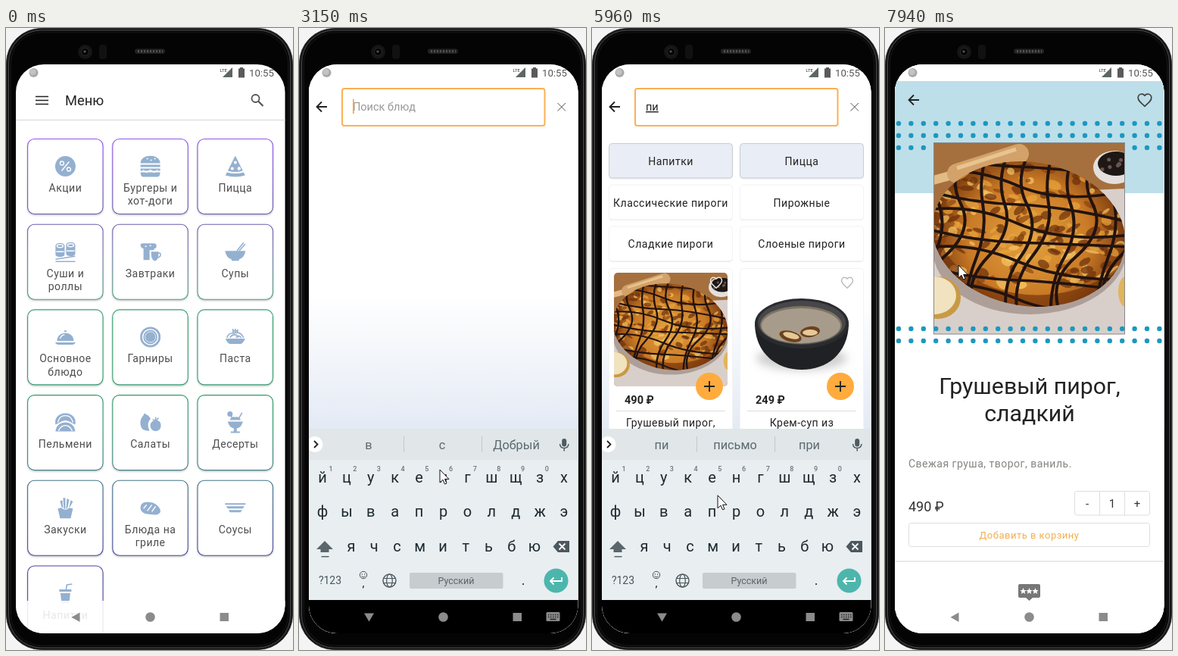
Animation, 379 px wide and 821 px high, one loop 8 s. Source, as an HTML page:

```html
<!DOCTYPE html>
<html lang="ru">
<head>
<meta charset="utf-8">
<title>Меню</title>
<style>
html, body { margin: 0; width: 100%; height: 100%; overflow: hidden; background: #f4f4f4 }
svg { display: block; width: 379px; height: 821px; font-family: Roboto, "Open Sans", sans-serif }
.m { text-anchor: middle }
.ls { letter-spacing: .5px }
.i { fill: #94b0d0; stroke: none }
.l { fill: none; stroke: #94b0d0; stroke-width: 1.6 }
.w { fill: none; stroke: #fff; stroke-width: 1.4 }
</style>
</head>
<body>
<svg id="stage" viewBox="0 0 379 821"></svg>
<script>
const LOOP = 8000;
const range = (n, f) => Array.from({ length: n }, (_, i) => f(i)).join('');
const text = (x, y, s, size, fill, cls = '', more = '') =>
  `<text x="${x}" y="${y}" font-size="${size}" fill="${fill}" class="${cls}" ${more}>${s}</text>`;
const rect = (x, y, w, h, fill, r = 0, more = '') =>
  `<rect x="${x}" y="${y}" width="${w}" height="${h}" rx="${r}" fill="${fill}" ${more}/>`;
const circle = (x, y, r, fill, more = '') => `<circle cx="${x}" cy="${y}" r="${r}" fill="${fill}" ${more}/>`;
const oval = (x, y, rx, ry, fill, more = '') => `<ellipse cx="${x}" cy="${y}" rx="${rx}" ry="${ry}" fill="${fill}" ${more}/>`;
const line = (d, stroke, w = 1, more = '') => `<path d="${d}" fill="none" stroke="${stroke}" stroke-width="${w}" ${more}/>`;
const shape = (d, fill, more = '') => `<path d="${d}" fill="${fill}" ${more}/>`;
const p = (cls, d) => `<path class="${cls}" d="${d}"/>`;
const at = (x, y, body, s = 1) => `<g transform="translate(${x} ${y}) scale(${s})">${body}</g>`;
const group = (id, body) => `<g id="${id}">${body}</g>`;
let seed = 7;
const rnd = () => (seed = seed * 16807 % 2147483647) / 2147483647;

const heart = (x, y, s, c) => at(x, y, line('M0 9.5C-6 4-10 1-10-3.5C-10-6.5-7.6-9-4.5-9C-2.8-9-1-8 0-6.7C1-8 2.8-9 4.5-9C7.6-9 10-6.5 10-3.5C10 1 6 4 0 9.5Z', c, 2), s);
const back = (x, y) => line(`M${x + 7} ${y}H${x - 6}M${x} ${y - 6.5}L${x - 6.5} ${y}L${x} ${y + 6.5}`, '#222', 1.8);

// Menu
const dishes = [
  ['Акции', p('i', 'M-13.5 0a13.5 13.5 0 1 0 27 0a13.5 13.5 0 1 0-27 0') + p('w', 'M5-6L-5 6M-7-4a2.5 2.5 0 1 0 5 0a2.5 2.5 0 1 0-5 0M2 4a2.5 2.5 0 1 0 5 0a2.5 2.5 0 1 0-5 0')],
  ['Бургеры и|хот-доги', p('i', 'M-13-4C-13-17 13-17 13-4ZM-13-2H13V1H-13ZM-13 3H13V6H-13ZM-13 8H13Q13 14 9 14H-9Q-13 14-13 8') + p('w', 'M-5-10h2M0-8h2M5-10h2M-10 5L-5 8L0 5L5 8L10 5')],
  ['Пицца', p('i', 'M0-14L10 6Q0 9-10 6ZM-11 8Q0 11 11 8L13 12Q0 16-13 12Z') + circle(0, -5, 2, '#fff') + circle(-4, 3, 2, '#fff') + circle(5, 3, 2.2, '#fff')],
  ['Суши и|роллы', p('i', 'M-13-8a6 3.5 0 0 1 12 0V4a6 3 0 0 1-12 0ZM1-9a6 3.5 0 0 1 12 0V3a6 3 0 0 1-12 0Z') + p('w', 'M-11-7.5a4 2 0 1 0 8 0a4 2 0 1 0-8 0M3-8.5a4 2 0 1 0 8 0a4 2 0 1 0-8 0M-12 0h10M2-1h10') + p('l', 'M-13 10L13 6M-13 13H13')],
  ['Завтраки', p('i', 'M-13-9Q-13-11-10-11H4Q9-11 8-7Q8-4 5-4V-2H-1V11H-9V-4Q-13-5-13-9M1 0H11Q11 12 6 12Q1 12 1 0') + p('l', 'M10 2q5-1 3 4q-2 2-4 2') + p('w', 'M-7-7h2M-1-8h2')],
  ['Супы', p('i', 'M-13.5-1H13.5Q12 8 5 10V12H-5V10Q-12 8-13.5-1') + p('l', 'M2-1L11-12M5-1L13-10')],
  ['Основное|блюдо', p('i', 'M-11 5C-11-9 11-9 11 5ZM-13.5 7H13.5Q12 10 9 10H-9Q-12 10-13.5 7M-2-7a2 2 0 1 1 4 0') + p('w', 'M-7 2Q-5-3-1-3')],
  ['Гарниры', circle(0, 0, 13.5, '#94b0d0') + circle(0, 0, 10, 'none', 'class="w"') + circle(0, 0, 7, 'none', 'stroke="#fff" stroke-width=".7"')],
  ['Паста', p('i', 'M-13 2H13Q10 9 7 9H-7Q-10 9-13 2') + p('l', 'M-11 1Q-9-6-2-5Q7-8 11 1M-7 1Q-5-3-1-3T4 1M1 1Q4-4 8 1M-3-5V-11M0-5V-11M3-5V-10M-3-8H3')],
  ['Пельмени', p('i', 'M-13 3C-17-17 17-17 13 3L9 1Q0-6-9 1ZM-13 12C-12-4 12-4 13 12Z') + p('w', 'M-10 0Q-8-9 0-9T10 0M-9 11Q-6 4 0 4T9 11')],
  ['Салаты', p('i', 'M-13 3C-14-7-9-7-8-12L-3-9Q2-5-1-3Q-5 3-1 11Q-12 12-13 3M0 4C0-4 14-6 14 4C14 14 0 14 0 4') + p('l', 'M3-4L7-2L11-6M7-2V-7')],
  ['Десерты', p('i', 'M-10-1H10Q8 7 2 8V12H6V14H-6V12H-2V8Q-8 7-10-1M-7-3a5 5 0 0 1 7-4a5 5 0 0 1 7 4Z') + p('l', 'M-4-6L-9-13M5-6L9-13') + circle(-7, -11, 3.5, '#94b0d0')],
  ['Закуски', p('i', 'M-10 1L-5 0Q0 5 5 0L10 1L7 14H-7ZM-7-9L-4-10L-3 0L-5-1ZM-3-13H0V2L-2 1ZM2-12L5-11L3 0L1 2ZM7-10L10-8L6-1L5-1Z')],
  ['Блюда на|гриле', p('i', 'M-13 0C-13-9-3-8 2-7C9-5 15 2 13 6C10 12-1 8-6 8Q-13 6-13 0') + p('w', 'M-9 1L-5-4M-4 4L2-4M2 5L7-2')],
  ['Соусы', p('i', 'M-13.5-6H13.5V-4H-13.5ZM-12-2H12L10 1H-10ZM-9 3H9L7 6H-7Z')],
  ['Напитки', p('i', 'M-8-5H8V-2H-8ZM-6.5 0H6.5L5 13H-5Z') + p('l', 'M1-5L2-11L9-12')]
];
const menu = rect(13, 48, 356, 751, '#fff') +
  line('M39 90.5H56M39 95.5H56M39 100.5H56', '#222', 1.7) + text(78, 102, 'Меню', 18.3, '#222') +
  circle(329.5, 93, 5, 'none', 'stroke="#555" stroke-width="1.8"') + line('M333 96.5L339.5 103', '#555', 2.2) +
  line('M13 121.5H369', '#e0e0e0', 1.6) +
  dishes.map(([name, icon], i) => {
    const x = 28.6 + i % 3 * 112.2, y = 146.5 + Math.floor(i / 3) * 112.7;
    return rect(x, y, 99.4, 99, '#fff', 9, 'stroke="url(#edge)" stroke-width="1.1" filter="url(#soft)"') +
      at(x + 49.8, y + 36, icon) +
      name.split('|').map((s, k) => text(x + 49.8, y + 69.5 + k * 17.3, s, 14, '#4d4d4d', 'm ls')).join('');
  }).join('') + rect(13, 756, 356, 43, '#fff', 0, 'opacity=".87"');

// Pictures
const pie = rect(0, 0, 252, 252, '#a5703d') +
  shape('M0 110L30 70L252 60V252H0Z', '#d9cfca') +
  line('M-5 50L24 42', '#e2bb85', 12) + line('M30 40L112 14', '#d2a26a', 26, 'stroke-linecap="round"') +
  line('M30 33L108 8', '#e8c48f', 5) +
  oval(238, 32, 28, 22, '#e4dfdc') + oval(240, 27, 24, 16, '#1d1715') +
  range(7, () => circle(222 + rnd() * 30, 18 + rnd() * 18, 2.5, '#6a5650')) +
  oval(126, 140, 128, 86, '#75655c', 'opacity=".45"') +
  `<g clip-path="url(#pieEdge)">` + rect(-10, 0, 270, 252, 'url(#crust)') +
  range(210, () => {
    const x = rnd() * 250, y = 30 + rnd() * 160;
    return oval(x, y, 3 + rnd() * 8, 2 + rnd() * 4, ['#f6c765', '#8d430f', '#eaa63c', '#6c300a'][rnd() * 4 | 0],
      `opacity=".7" transform="rotate(${rnd() * 90 - 45} ${x} ${y})"`);
  }) +
  line('M-5 125C20 215 175 245 258 165', '#6b2c08', 22, 'opacity=".6"') +
  range(11, i => line(`M${i * 29 - 15} 5q${-14 - i % 3 * 6} 40-8 75t${i % 2 * 14 - 22} 70t-18 80`, '#22130f', 4)) +
  range(9, i => line(`M-10 ${i * 25 - 12}q60 ${i % 2 * 24 - 8} 120 18t150 ${24 - i % 3 * 9}`, '#22130f', 3.6)) + '</g>' +
  oval(5, 204, 30, 28, '#c99a45') + oval(0, 201, 29, 25, '#f1e2c0') + oval(253, 196, 10, 20, '#e2b45c');
const soup = oval(277, 436, 60, 16, '#8886', 'filter="url(#blur)"') +
  shape('M215 391C216 430 244 451 277 451S338 430 339 391Z', '#202124') +
  oval(277, 390, 62, 33, '#2a2b2e') + oval(277, 389, 58, 29, '#47474a') + oval(276, 392, 54, 25, '#7e7464') + oval(276, 393, 52, 23, '#a79c8b') +
  oval(262, 407, 15, 7, '#6d421c', 'transform="rotate(15 262 407)"') + oval(263, 406, 11, 4, '#e6c999', 'transform="rotate(15 263 406)"') +
  oval(288, 401, 13, 7, '#6d421c', 'transform="rotate(-8 288 401)"') + oval(288, 402, 10, 4, '#e6c999');

// Search
const chips = (names, filled) => names.map((s, i) => {
  const x = 22.5 + i % 2 * 173, y = 152.5 + Math.floor(i / 2) * 54.7, on = i < filled;
  return rect(x, y, 163, 45.5, on ? '#e9edf5' : '#fff', 4, `stroke="${on ? '#c5ccd8' : '#f3f3f3'}" filter="url(#faint)"`) +
    text(x + 81.5, y + 28.5, s, 14, '#222', 'm ls');
}).join('');
const tile = (x, y) => rect(x, y, 163, 260, '#fff', 4, 'stroke="#f3f3f3"');
const loading = chips(['Напитки', 'Паста', 'Пельмени', 'Пицца', 'Супы', 'Классические пироги', 'Мелкая выпечка', 'Пирожные', 'Птица', 'Сладкие пироги', 'Слоеные пироги'], 5) +
  [0, 173].map(d => tile(22.5 + d, 481) + rect(80 + d, 518.5, 48, 30, '#c6cacd', 8) + rect(56 + d, 527, 97, 30, '#c6cacd', 5) + heart(164 + d, 500, .75, '#aaa')).join('') +
  rect(22, 494, 51, 18, '#fdcb45', 2) + text(48, 506.5, 'АКЦИЯ', 9.5, '#333', 'm', 'letter-spacing="1.2"');
const product = (d, price, name, tint) => circle(155 + d, 473, 18, '#ffab3d') + line(`M${148 + d} 473H${162 + d}M${155 + d} 466V480`, '#222', 1.8) +
  heart(164 + d, 336, .75, tint) + text(43 + d, 496, price, 14.5, '#222', '', 'font-weight="700"') +
  line(`M${32 + d} 505.5H${176 + d}`, '#ddd') + text(104 + d, 525.5, name, 14, '#222', 'm ls');
const found = chips(['Напитки', 'Пицца', 'Классические пироги', 'Пирожные', 'Сладкие пироги', 'Слоеные пироги'], 2) +
  tile(22.5, 317.5) + tile(195.5, 317.5) +
  `<g clip-path="url(#thumb)">${at(29, 323, pie, 150 / 252)}</g>` + soup +
  product(0, '490 ₽', 'Грушевый пирог,', '#e8e8e8') + product(173, '249 ₽', 'Крем-суп из', '#bbb');
const search = rect(13, 48, 356, 751, '#fff') + rect(13, 70, 356, 729, 'url(#sky)', 0, 'id="backdrop"') +
  group('loading', loading) + group('found', found) + back(30, 104) +
  rect(57, 80, 267.5, 49, '#fff', 3, 'id="field" stroke-width="2"') +
  line('M341.5 99L352 109.5M352 99L341.5 109.5', '#555') +
  text(71, 109, '', 14.5, '#222', '', 'id="query"') + rect(71, 94, 1.7, 19, '#fba43a', 0, 'id="caret"');

// Product page
const dots = y => range(22, i => circle(18 + i * 16.4, y, 3.2, '#1c98bf'));
const stars = [-8, 0, 8].map(d => shape(`M${190.5 + d} 739l1.2 2.9 3 .2-2.3 1.9.8 3-2.7-1.7-2.7 1.7.8-3-2.3-1.9 3-.2Z`, '#fff')).join('');
const page = rect(13, 48, 356, 751, '#fff') + rect(13, 70, 356, 148, '#bddfea') + back(38, 95) + heart(343, 95, .88, '#444') +
  dots(126) + dots(142) + dots(158) + at(65, 152, `<g clip-path="url(#square)">${pie}</g>`) +
  rect(64.5, 151.5, 252, 252.5, 'none', 0, 'stroke="#888"') + dots(397) + dots(413) +
  text(191, 482.5, 'Грушевый пирог,', 30.3, '#222', 'm') + text(191, 519, 'сладкий', 30.3, '#222', 'm') +
  text(31, 580, 'Свежая груша, творог, ваниль.', 14, '#88847f', 'ls') + text(31, 638, '490 ₽', 18, '#333') +
  rect(250.5, 611.5, 99, 31.5, '#fff', 3, 'stroke="#ddd"') + line('M283.5 612V643M316.5 612V643', '#ddd') +
  ['-', '1', '+'].map((s, i) => text(267 + i * 33, 633, s, 15, '#333', 'm')).join('') +
  rect(31.5, 653.5, 318, 31, '#fff', 3, 'stroke="#ddd"') + text(190.5, 674, 'Добавить в корзину', 13, '#f4ae4b', 'm ls') +
  line('M13 704H369', '#e2e2e2', 1.5) +
  shape('M178 734H203Q205 734 205 736V750Q205 752 203 752H195L190.5 756L186 752H178Q176 752 176 750V736Q176 734 178 734', '#777') + stars;

// Keyboard
const keys = (s, x, step, y) => [...s].map((c, i) => text(x + i * step, y, c, 20, '#1d2a30', 'm')).join('');
const keyboard = rect(13, 529, 356, 227, '#e9eef1') + rect(13, 529, 356, 41, '#e1e6e9') + rect(13, 755, 356, 45, '#000') +
  circle(21, 549.5, 10.5, '#fff') + line('M20 545L24.5 549.5L20 554', '#222', 1.8) +
  [92, 189, 287].map((x, i) => text(x, 556, '', 16.3, '#5b6a70', 'm', `id="hint${i}"`)).join('') +
  line('M138.5 539V560M241.5 539V560', '#c3c9cc') +
  rect(347.2, 542, 6, 10.5, '#4f5b60', 3) + line('M344.5 549Q345 554.5 350.2 554.5T356 549M350.2 554V558.5', '#4f5b60', 1.5) +
  keys('йцукенгшщзх', 31, 31.9, 600) + keys('фывапролджэ', 31, 31.9, 645) + keys('ячсмитьбю', 69, 30.25, 691) +
  [...'1234567890'].map((c, i) => text(42 + i * 31.7, 585, c, 9, '#68757a', 'm', 'font-weight="500"')).join('') +
  shape('M34 677L45 688H39.5V692H28.5V688H23Z', '#5a666b') + rect(29.5, 697, 10, 1.5, '#5a666b') +
  shape('M342 677H357V692H342L335.5 684.5Z', '#4c585d') + line('M343.5 680.5L351.5 688.5M351.5 680.5L343.5 688.5', '#fff', 1.8) +
  text(41, 734, '?123', 14, '#48555a', 'm') + circle(85, 722, 4.7, 'none', 'stroke="#48555a"') + circle(83.3, 721, .7, '#48555a') + circle(86.7, 721, .7, '#48555a') +
  line('M82.5 723.5Q85 726.5 87.5 723.5', '#48555a') + text(85, 738, ',', 15, '#222', 'm') +
  circle(119.5, 729.5, 8.5, 'none', 'stroke="#48555a" stroke-width="1.4"') + oval(119.5, 729.5, 3.8, 8.5, 'none', 'stroke="#48555a" stroke-width="1.2"') + line('M112 726.5H127M112 732.5H127', '#48555a', 1.2) +
  rect(146, 719, 123.5, 21, '#c7cccf', 2) + text(207.5, 734, 'Русский', 12.5, '#59656a', 'm') + text(296, 735, '.', 18, '#222', 'm') +
  circle(339.5, 729.5, 16, '#4db6ac') + line('M347 725V730H332.5M336.5 725.5L332 730L336.5 734.5', '#fff', 1.8);

const grey = '#8b8b8b';
const nav = shape('M97.5 771.5V784L86.5 777.7Z', grey, 'id="navBack"') +
  circle(190.5, 777.5, 6.3, grey) + rect(282.5, 772, 11.5, 11, grey) +
  group('navDown', shape('M86 772.5H99L92.5 783.5Z', grey) + rect(326.5, 771, 18, 12, grey, 1.5) +
    line('M329 774.5H342.5M329 777.5H342.5', '#222', 1.4, 'stroke-dasharray="1.5 1.5"') + line('M331.5 780.5H339.5', '#222', 1.4));
const status = circle(36.5, 59, 6, '#a9a9a9') + circle(35.5, 58, 4, '#c3c3c3') + text(282.5, 57.5, 'LTE', 5.8, '#555', '', 'font-weight="500"') +
  shape('M299 52V65H286Z', '#5d6662') + shape('M309 52H313V53.5H315V65.5H307V53.5H309Z', '#5a5a5a') + text(321, 64, '10:55', 13.2, '#555');

const body = rect(.5, .5, 378, 820, '#151515', 46, 'stroke="#2c2c2c"') +
  rect(3.5, 3, 372, 815, '#090909', 43, 'stroke="#4c4c4c"') + rect(6.5, 6, 366, 809, '#040404', 41, 'stroke="#161616"') +
  circle(104.5, 31.5, 9.5, '#151515') + circle(104.5, 31.5, 5, '#050505', 'stroke="#2b2b2b"') + circle(104, 31, 1.6, '#555') +
  rect(123, 22, 10, 19, '#111', 4) + rect(170, 27.5, 40, 6.5, '#222', 3.2) + line('M174 30.8H207', '#555', 3, 'stroke-dasharray="2 2"');

const stops = list => list.map(([o, c]) => `<stop offset="${o}" stop-color="${c}"/>`).join('');
stage.innerHTML = `<defs>
<linearGradient id="edge" gradientUnits="userSpaceOnUse" x1="0" y1="146" x2="0" y2="800">${stops([[0, '#9357ee'], [.15, '#6758ae'], [.22, '#7772b4'], [.32, '#4b9c79'], [.36, '#319c6d'], [.58, '#369a70'], [.68, '#447b8a'], [.84, '#4a479c'], [1, '#5550b2']])}</linearGradient>
<linearGradient id="sky" x1="0" y1="0" x2="0" y2="1">${stops([[.62, '#fff'], [1, '#e4eaf5']])}</linearGradient>
<radialGradient id="crust">${stops([[0, '#e5a43f'], [.6, '#c97a26'], [1, '#6e300a']])}</radialGradient>
<radialGradient id="spot">${stops([[.3, '#f4d51c'], [1, '#f4d51c00']])}</radialGradient>
<filter id="soft" x="-10%" y="-10%" width="120%" height="125%"><feDropShadow dx="0" dy="1.2" stdDeviation=".9" flood-opacity=".25"/></filter>
<filter id="faint" x="-10%" y="-10%" width="120%" height="125%"><feDropShadow dx="0" dy=".7" stdDeviation=".6" flood-opacity=".13"/></filter>
<filter id="blur" x="-20%" y="-50%" width="140%" height="200%"><feGaussianBlur stdDeviation="6"/></filter>
<clipPath id="screen"><rect x="13" y="48" width="355.5" height="751" rx="37"/></clipPath>
<clipPath id="pieEdge"><ellipse cx="125" cy="120" rx="128" ry="95" transform="rotate(9 125 120)"/></clipPath>
<clipPath id="square"><rect width="252" height="252"/></clipPath>
<clipPath id="thumb"><rect x="29" y="323" width="150" height="150" rx="5"/></clipPath>
</defs>${body}<g clip-path="url(#screen)">${menu}${circle(332, 95, 21, '#000', 'id="ripple"')}${group('search', search)}${group('page', page)}${group('keyboard', keyboard)}${nav}${status}</g>
${circle(0, 0, 13, 'url(#spot)', 'id="tap"')}${group('cursor', '<path d="M0 0V17L4 13.3L6.5 19L9 18L6.6 12.4H12Z" fill="#fff" stroke="#111"/>')}`;

// Motion
const path = [[660, 368, 588], [1340, 333, 94], [2600, 333, 94], [2870, 192, 531], [3080, 192, 531], [3150, 186, 583], [3490, 158, 632],
  [3850, 158, 632], [4450, 189, 674], [4570, 189, 674], [5000, 190, 683], [5700, 190, 683], [6450, 104, 446], [6520, 104, 446], [6800, 102, 381], [7740, 102, 381], [7940, 97, 313]];
const caretOff = [[2600, 3150], [3420, 3820], [4300, 4570], [5000, 5300], [5700, 6100], [6520, 8000]];
const taps = [1540, 3750, 4570, 7000];
const ramp = (t, a, b) => Math.min(1, Math.max(0, (t - a) / (b - a)));
const ease = k => k * k * (3 - 2 * k);
const $ = id => document.getElementById(id);
const set = (id, attrs) => { for (const k in attrs) $(id).setAttribute(k, attrs[k]); };
const show = (id, alpha) => { $(id).style.display = alpha > 0 ? '' : 'none'; $(id).style.opacity = +alpha; };

function pointer(t) {
  const i = path.findIndex(q => q[0] > t);
  if (i < 1) return path[i < 0 ? path.length - 1 : 0].slice(1);
  const [a, x, y] = path[i - 1], [b, u, v] = path[i], k = ease(ramp(t, a, b));
  return [x + (u - x) * k, y + (v - y) * k];
}

function draw(t) {
  const opened = ease(ramp(t, 1950, 2250)), up = opened * (1 - ease(ramp(t, 7540, 7840)));
  show('search', ramp(t, 1750, 2060));
  show('page', ramp(t, 7130, 7350));
  show('keyboard', up > 0);
  set('keyboard', { transform: `translate(0 ${270 * (1 - up)})` });
  set('backdrop', { height: 729 - 270 * opened });
  show('ripple', t >= 1560 && t < 2300 ? .07 : 0);
  set('ripple', { r: 21 * ramp(t, 1540, 1700) });
  set('field', { stroke: t < 1950 ? '#cbbba6' : '#fbb054' });

  const typed = t < 3900 ? '' : t < 4700 ? 'п' : 'пи';
  $('query').textContent = typed || 'Поиск блюд';
  set('query', { fill: typed ? '#222' : '#999', 'text-decoration': typed ? 'underline' : 'none' });
  set('caret', { x: 71 + typed.length * 8.6 });
  show('caret', !caretOff.some(([a, b]) => t >= a && t < b));
  const hints = !typed || t >= 7400 ? ['в', 'с', 'Добрый'] : typed === 'п' ? ['п', 'по', 'при'] : ['пи', 'письмо', 'при'];
  hints.forEach((s, i) => $('hint' + i).textContent = s);
  show('loading', t < 5950 ? ramp(t, 4900, 5100) : 0);
  show('found', t >= 5950);

  const shown = t >= 1800 && t < 7860;
  show('navDown', shown);
  show('navBack', !shown);
  const [x, y] = pointer(t);
  show('cursor', t >= 660);
  set('cursor', { transform: `translate(${x} ${y})` });
  show('tap', taps.some(a => t >= a && t < a + 160));
  set('tap', { cx: x - 1, cy: y });
}

const start = performance.now();
function tick() {
  draw((performance.now() - start) % LOOP);
  requestAnimationFrame(tick);
}
tick();
</script>
</body>
</html>
```
